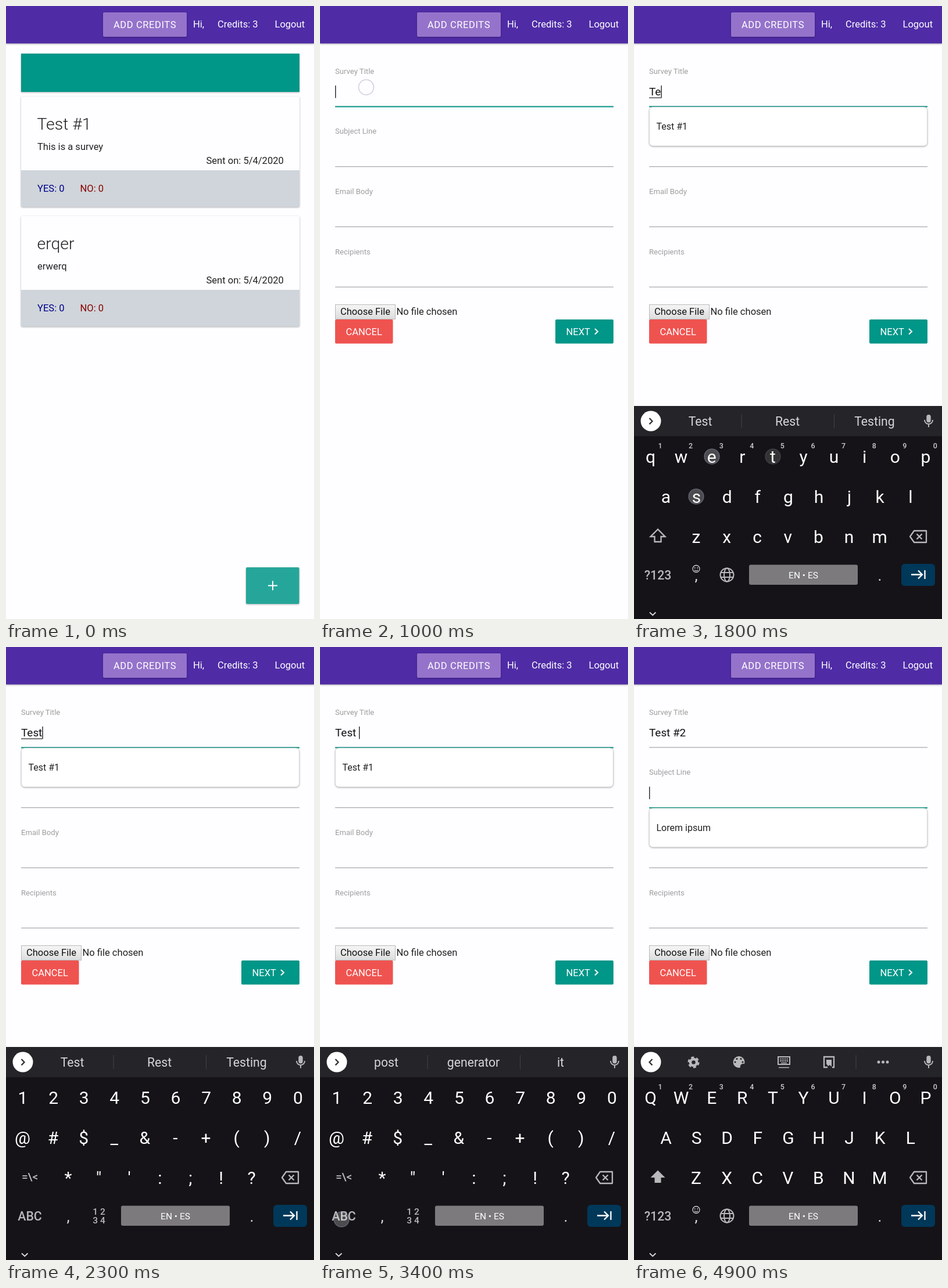
Recreate the animation shown at these times as an HTML page. Size 530 by 1056 pixels, loop 5000 ms.

```html
<!DOCTYPE html>
<html>
<head>
<meta charset="utf-8">
<style>
  html, body { margin: 0; width: 100%; height: 100%; overflow: hidden; background: #fefdff; }
  svg { display: block; font-family: Roboto, sans-serif; }
  text { white-space: pre; }
  .raised { filter: drop-shadow(0 1.5px 1.5px rgba(0, 0, 0, .32)); }
  .mid { text-anchor: middle; }
  .line { fill: none; stroke-width: 2.3; }
</style>
</head>
<body>
<svg id="stage" width="530" height="1056" viewBox="0 0 530 1056"></svg>
<script>
const LOOP = 5000, STEP = 100;
const INK = '#212121', TEAL = '#009688', GREY = '#b9b8bb', BASE = 16.55, KEY_GAP = 52.6;

const escapeText = s => s.replace(/&/g, '&amp;').replace(/</g, '&lt;');
const text = (x, y, s, size = BASE, fill = INK, attrs = '') =>
  `<text x="${x}" y="${y}" font-size="${size}" fill="${fill}" ${attrs}>${escapeText(s)}</text>`;
const centered = (x, y, s, size, fill, attrs = '') => text(x, y, s, size, fill, `class="mid" ${attrs}`);
const rect = (x, y, w, h, fill, attrs = '') =>
  `<rect x="${x}" y="${y}" width="${w}" height="${h}" fill="${fill}" ${attrs}/>`;
const circle = (x, y, r, fill, attrs = '') => `<circle cx="${x}" cy="${y}" r="${r}" fill="${fill}" ${attrs}/>`;
const line = (d, stroke, attrs = '') => `<path class="line" d="${d}" stroke="${stroke}" ${attrs}/>`;
const group = (id, ...parts) => `<g id="${id}">${parts.join('')}</g>`;
const keyRow = (chars, x, y, size = 30, fill = '#fff', attrs = '') =>
  [...chars].map((c, i) => centered(x + i * KEY_GAP, y, c, size, fill, attrs)).join('');

const header = rect(0, -4, 530, 68.5, '#4f2ca6', 'class="raised"')
  + rect(167, 11, 144, 42, '#9573cb', 'rx="2" class="raised"')
  + text(185, 38, 'ADD CREDITS', BASE, '#fff', 'letter-spacing=".59"')
  + text(322, 37, 'Hi,', BASE, '#fff')
  + text(364, 37, 'Credits: 3', BASE, '#fff')
  + text(462.5, 37, 'Logout', BASE, '#fff');

const card = (y, title, body) => `<g transform="translate(0 ${y})">`
  + rect(26, 0, 479, 190, '#fefdff', 'rx="2" class="raised"')
  + rect(26, 127, 479, 63, '#cfd5da')
  + text(53.5, 56.5, title, 28.4, INK, 'font-weight="300"')
  + text(54, 92, body)
  + text(344.5, 116, 'Sent on: 5/4/2020')
  + text(54, 164, 'YES: 0', BASE, '#00008b')
  + text(127.5, 164, 'NO: 0', BASE, '#8b0000') + '</g>';

const surveys = rect(26, 82, 479, 66, TEAL, 'class="raised"')
  + card(156, 'Test #1', 'This is a survey')
  + card(362, 'erqer', 'erwerq')
  + rect(413, 967, 91.5, 63, '#26a69a', 'rx="2" class="raised"')
  + line('M451 998.5h16m-8-8v16', '#fff', 'style="stroke-width:2"');

const fieldTop = i => i * 103.7;
const fields = ['Survey Title', 'Subject Line', 'Email Body', 'Recipients'].map((label, i) =>
  text(26, 116.5 + fieldTop(i), label, 13.1, '#9e9e9e')
  + rect(26, 172.4 + fieldTop(i), 479, 1.2, '#a5a4a6')).join('');
const actions = rect(26.5, 514.5, 103, 25, 'url(#chrome)', 'stroke="#b9b9b9"')
  + text(35, 531.5, 'Choose File', BASE, '#111')
  + text(131.5, 531.5, 'No file chosen')
  + rect(26, 540, 99.5, 41.5, '#ef5350', 'rx="2"')
  + text(44.5, 566.5, 'CANCEL', BASE, '#fff')
  + rect(405, 540, 100, 41.5, TEAL, 'rx="2"')
  + text(423.5, 566.5, 'NEXT', BASE, '#fff')
  + line('M473 556l5 4.7-5 4.7', '#fff', 'style="stroke-width:2"');
const dropdown = (id, i, s) => group(id,
  rect(26.5, 174 + fieldTop(i), 478, 67, '#fff', 'rx="6" stroke="#ccc" stroke-width=".6" class="raised"'),
  text(38.5, 213 + fieldTop(i), s, 16));

const mic = rect(503.3, 704, 7.4, 13.5, GREY, 'rx="3.7"')
  + line('M500 713c0 9.500 14 9.500 14 0M507 720v5.500', GREY, 'style="stroke-width:2"');
const separator = x => rect(x, 703, 1, 24, '#444347');
const tools = line('M31.500 710l-5 5.200 5 5.200', '#333')
  + circle(102.5, 715.5, 5.5, 'none', `stroke="${GREY}" stroke-width="4.500"`)
  + circle(102.5, 715.5, 8.6, 'none', `stroke="${GREY}" stroke-width="3" stroke-dasharray="5 4.010"`)
  + circle(180.5, 715, 10, GREY)
  + circle(188, 723, 5.3, '#252428')
  + [[174, 715], [177, 709.5], [184, 709.5], [187, 715]].map(([x, y]) => circle(x, y, 1.6, '#252428')).join('')
  + rect(248, 706, 20, 13, 'none', `stroke="${GREY}" stroke-width="2"`)
  + line('M251 709.700h14M251 713h14', GREY, 'style="stroke-width:1.800" stroke-dasharray="2 1"')
  + line('M253 716.500h10M249 724.500h18', GREY, 'style="stroke-width:1.600"')
  + line('M333 724h-6v-18h17v18h-3', GREY)
  + `<path d="M331 711h9v12l-3-3-3 2-3-4z" fill="${GREY}"/>`
  + separator(381.5)
  + [421, 428.5, 436].map(x => circle(x, 715, 2.5, GREY)).join('');
const suggestions = (id, words) => group(id,
  line('M26.500 710l5 5.200-5 5.200', '#333'),
  words.map((w, i) => centered(114 + 150 * i, 723, w, 21.2, '#d6d5d8')).join(''),
  separator(184.5), separator(344));

const letterRows = rows => rows.map((r, i) => keyRow(r, [28.5, 55, 107][i], [787, 856, 924.5][i])).join('');
const letterKeys = ['QWERTYUIOP', 'ASDFGHJKL', 'ZXCVBNM'];
const shiftShape = 'M41 901.500l-12.500 12.500h7v9h11v-9h7z';
const letters = keyRow('1234567890', 45, 762, 12.5, '#ccc', 'font-weight="500"')
  + group('upper', letterRows(letterKeys), `<path d="${shiftShape}" fill="${GREY}"/>`)
  + group('lower', letterRows(letterKeys.map(r => r.toLowerCase())), line(shiftShape, GREY))
  + centered(41, 988, '?123', 21.3, GREY, 'font-weight="500"')
  + circle(107, 969.5, 6, 'none', 'stroke="#ccc" stroke-width="1.300"')
  + circle(104.7, 968, 1, '#ccc') + circle(109.3, 968, 1, '#ccc')
  + line('M104 971.500q3 3 6 0', '#ccc', 'style="stroke-width:1.200"')
  + circle(160, 980, 11.5, 'none', `stroke="${GREY}" stroke-width="2"`)
  + `<ellipse cx="160" cy="980" rx="5" ry="11.500" fill="none" stroke="${GREY}" stroke-width="2"/>`
  + line('M149.500 976h21M149.500 984h21', GREY, 'style="stroke-width:1.800"');
const symbols = keyRow('1234567890', 29, 787)
  + keyRow('@#$_&-+()/', 28.5, 856)
  + keyRow('*"\':;!?', 107, 924.5)
  + centered(41, 919, '=\\<', 19, GREY, 'font-weight="500"')
  + centered(41, 988, 'ABC', 21.3, GREY, 'font-weight="500"')
  + centered(160, 978, '1 2', 15.5, GREY, 'font-weight="500"')
  + centered(160, 993, '3 4', 15.5, GREY, 'font-weight="500"');

const keyboard = rect(0, 689, 530, 367, '#151317')
  + rect(0, 689, 530, 52, '#252428')
  + circle(29, 715, 17.5, '#fff') + mic
  + group('tools', tools)
  + suggestions('wordsTest', ['Test', 'Rest', 'Testing'])
  + suggestions('wordsNext', ['post', 'generator', 'it'])
  + group('letters', letters) + group('symbols', symbols)
  + line('M482 904h21v20h-21l-7-10z', GREY, 'stroke-linejoin="round"')
  + line('M486.500 909.500l9 9m0-9l-9 9', GREY)
  + centered(107, 990, ',', 26, '#ddd') + centered(423, 990, '.', 26, '#ddd')
  + rect(198, 962.5, 187, 34.5, '#7c7a7d', 'rx="3"')
  + centered(291.5, 985.7, 'EN • ES', 15.5, '#fff')
  + rect(460, 961, 58, 38, '#003859', 'rx="6"')
  + line('M477 979.500h19m-7-7l7 7-7 7M500.500 972v15', '#fff')
  + line('M27 1044.500l5.200 5 5.200-5', '#ddd', 'style="stroke-width:1.800"');

document.getElementById('stage').innerHTML =
  `<defs><linearGradient id="chrome" x2="0" y2="1"><stop stop-color="#f6f6f6"/>
   <stop offset="1" stop-color="#dcdcdc"/></linearGradient></defs>`
  + group('surveys', surveys)
  + group('form', fields, actions,
      `<rect id="focus" x="26" width="479" height="2.200" fill="#1fa193"/>`,
      dropdown('titleMenu', 0, 'Test #1'), dropdown('subjectMenu', 1, 'Lorem ipsum'),
      `<text id="typed" x="26" y="154" font-size="18.900" fill="#111"></text>`,
      `<rect id="composing" x="26" y="157.500" height="1.200" fill="#222"/>`,
      `<rect id="caret" width="1.400" height="21.500" fill="#222"/>`)
  + header + group('keyboard', keyboard) + group('touches');

const $ = id => document.getElementById(id);
const show = (id, on) => $(id).style.display = on ? '' : 'none';

// [time, x, y]
const taps = [
  [100, 459, 998], [900, 79.5, 140], [1300, 53, 915], [1600, 239, 776], [1700, 134, 776],
  [1800, 107, 845], [1900, 239, 776], [2000, 40, 983], [2600, 290, 980], [3300, 37, 986],
  [3500, 81, 846], [3700, 81, 776], [4100, 41.5, 270.5], [4600, 45, 915]
];
// [time, field content]
const typing = [[0, ''], [1700, 'T'], [1800, 'Te'], [1900, 'Tes'], [2000, 'Test'],
  [2700, 'Test '], [3600, 'Test #'], [3800, 'Test #2']];

function render(t) {
  const within = (from, to = LOOP) => t >= from && t < to;
  const onSubject = t >= 4200;

  show('surveys', t < 400);
  show('form', t >= 400);
  show('focus', t >= 1000);
  $('focus').setAttribute('y', 172.3 + fieldTop(t >= 4300 ? 1 : 0));
  show('titleMenu', within(1300, 3800));
  show('subjectMenu', t >= 4500);

  const typed = typing.filter(([at]) => t >= at).pop()[1];
  $('typed').textContent = typed;
  const width = typed ? $('typed').getComputedTextLength() : 0;
  show('composing', within(1700, 2700));
  $('composing').setAttribute('width', width);
  show('caret', t >= 1000);
  $('caret').setAttribute('x', onSubject ? 26 : 26 + width);
  $('caret').setAttribute('y', 137 + (onSubject ? fieldTop(1) : 0));

  const rise = Math.min(1, Math.max(0, (t - 1000) / 300));
  show('keyboard', rise > 0);
  $('keyboard').setAttribute('transform', `translate(0 ${367 * (1 - rise) ** 3})`);
  const wordsTest = within(1700, 2700), wordsNext = within(2700, 3600);
  show('wordsTest', wordsTest);
  show('wordsNext', wordsNext);
  show('tools', !wordsTest && !wordsNext);
  const isSymbols = within(2100, 2700) || within(3400, 4300);
  const isUpper = within(1400, 1700) || t >= 4700;
  show('symbols', isSymbols);
  show('letters', !isSymbols);
  show('upper', isUpper);
  show('lower', !isUpper);

  $('touches').innerHTML = taps.filter(([at]) => within(at, at + 300)).map(([at, x, y]) =>
    circle(x, y, 13, 'rgba(255,255,255,.24)',
      `stroke="rgba(150,150,185,.45)" stroke-width="1.500" opacity="${t - at < 200 ? 1 : .55}"`)).join('');
}

function frame() {
  render(Math.floor(performance.now() % LOOP / STEP) * STEP);
  requestAnimationFrame(frame);
}
frame();
</script>
</body>
</html>
```
